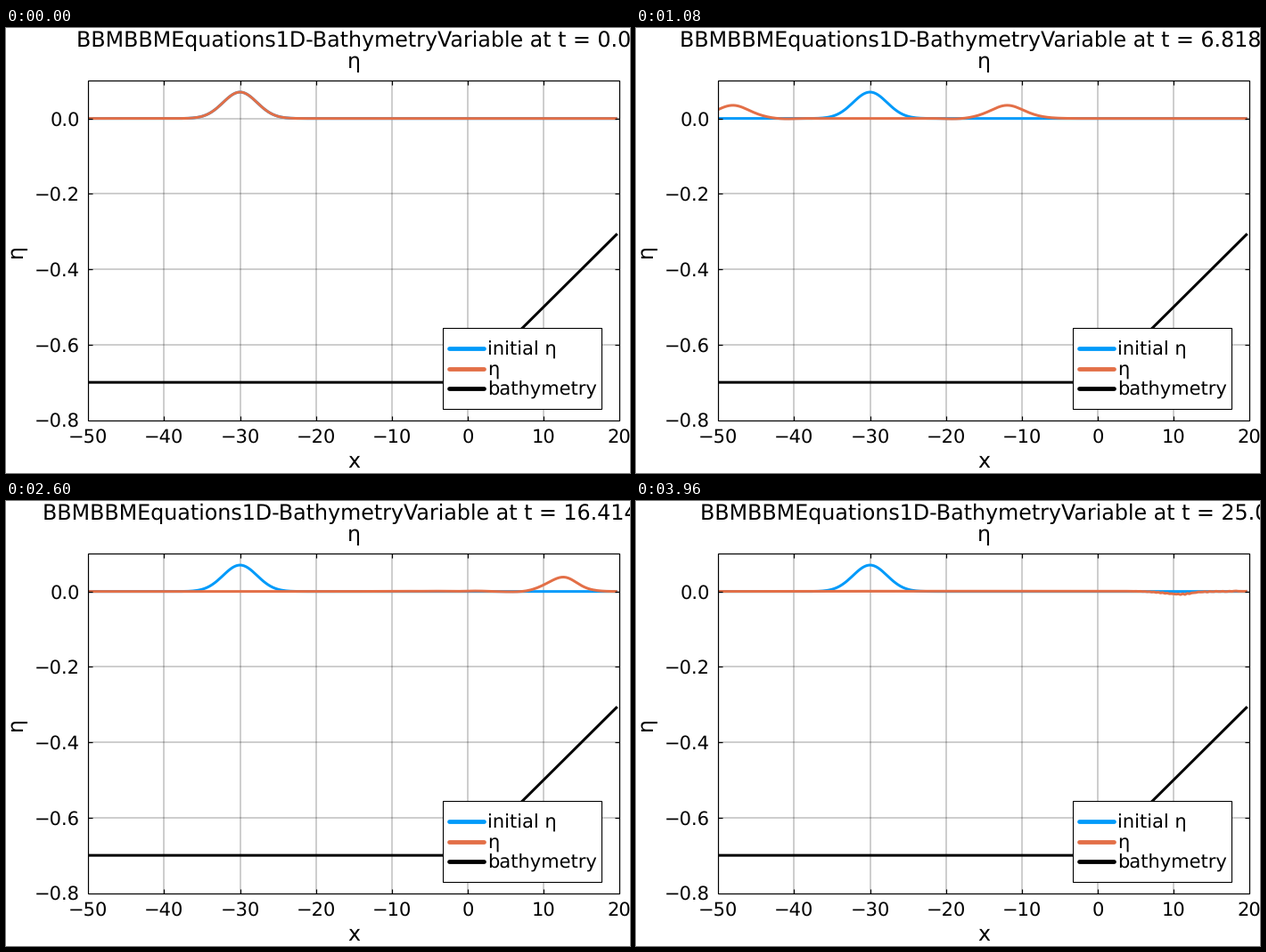
A matplotlib script for the animation above (4 s loop, 700 by 500 pixels).

```python
import numpy as np
import matplotlib.pyplot as plt
from matplotlib.animation import FuncAnimation
from matplotlib.patches import Rectangle

plt.rcParams["font.family"] = "DejaVu Sans"
plt.rcParams["text.hinting"] = "none"

W, H, DPI = 700, 500, 100
FRAMES, T_END = 100, 25.0
LEFT, RIGHT, TOP, BOTTOM = 92.3, 688.2, 59.3, 440.5
BLUE, ORANGE = "#009AFA", "#E36F47"
BIG, SMALL = 23.7, 21.0


def px(size):
    return size * 72 / DPI


def to_x(x):
    return LEFT + (x + 50) / 70 * (RIGHT - LEFT)


def to_y(y):
    return TOP + (0.1 - y) / 0.9 * (BOTTOM - TOP)


# BBM-BBM equations with variable bathymetry on a periodic grid
N, X0, X1, G = 512, -130.0, 20.0, 9.81
dx = (X1 - X0) / N
x = X0 + dx * np.arange(N)
depth = 0.7 - 0.02 * np.maximum(x, 0)
eta0 = 0.07 * np.exp(-0.1 * (x + 30) ** 2)


def stencil(weights):
    """Periodic matrix from {offset: weight}."""
    return sum(w * np.roll(np.eye(N), k, axis=1) for k, w in weights.items())


D1 = stencil({-2: 1, -1: -8, 1: 8, 2: -1}) / (12 * dx)
D2 = stencil({-2: -1, -1: 16, 0: -30, 1: 16, 2: -1}) / (12 * dx ** 2)
K = np.diag(depth ** 2) / 6
A_eta = -np.linalg.solve(np.eye(N) - D1 @ K @ D1, D1)
A_v = -np.linalg.solve(np.eye(N) - D2 @ K, D1)


def rhs(u):
    eta, v = u
    return np.array([A_eta @ ((eta + depth) * v),
                     A_v @ (G * eta + 0.5 * v ** 2)])


def solve(substeps=5):
    u = np.array([eta0, np.zeros(N)])
    h = T_END / (FRAMES - 1) / substeps
    waves = [eta0]
    for _ in range(FRAMES - 1):
        for _ in range(substeps):
            k1 = rhs(u)
            k2 = rhs(u + h / 2 * k1)
            k3 = rhs(u + h / 2 * k2)
            k4 = rhs(u + h * k3)
            u = u + h / 6 * (k1 + 2 * k2 + 2 * k3 + k4)
        waves.append(u[0])
    return waves


waves = solve()

fig = plt.figure(figsize=(W / DPI, H / DPI), dpi=DPI, facecolor="white")
ax = fig.add_axes([0, 0, 1, 1])
ax.set_xlim(0, W)
ax.set_ylim(H, 0)
ax.axis("off")


def label(lx, ly, text, size, ha="center", **kw):
    return ax.text(lx, ly, text, fontsize=px(size), ha=ha, va="baseline",
                   color="black", zorder=8, **kw)


def stroke(xs, ys, width, color="black", z=3, **kw):
    return ax.plot(xs, ys, color=color, lw=px(width), zorder=z,
                   solid_capstyle=kw.pop("cap", "butt"),
                   solid_joinstyle="round", **kw)[0]


def number(value, fmt):
    return format(value, fmt).replace("-", "\u2212")


# grid, ticks and tick labels
TICK = 5
for v in range(-50, 21, 10):
    gx = to_x(v)
    label(gx, 465.3, number(v, "d"), SMALL)
    if -50 < v < 20:
        stroke([gx, gx], [TOP, BOTTOM], 1.9, z=1, alpha=0.2)
        stroke([gx, gx], [BOTTOM, BOTTOM - TICK], 1.2, z=5)
        stroke([gx, gx], [TOP, TOP + TICK], 1.2, z=5)
for i in range(5):
    v = -0.2 * i
    gy = to_y(v)
    label(83.2, gy + 7.7, number(v if i else 0.0, ".1f"), SMALL, "right")
    if i < 4:
        stroke([LEFT, RIGHT], [gy, gy], 1.9, z=1, alpha=0.2)
        stroke([LEFT, LEFT + TICK], [gy, gy], 1.2, z=5)
        stroke([RIGHT, RIGHT - TICK], [gy, gy], 1.2, z=5)

frame = Rectangle((LEFT, TOP), RIGHT - LEFT, BOTTOM - TOP, fill=False,
                  ec="black", lw=px(1.2), zorder=5)
ax.add_patch(frame)

# curves
xs = to_x(x)
curves = [stroke(xs, to_y(y), 3, c, z=3 + i / 10)
          for i, (y, c) in enumerate([(eta0, BLUE), (eta0, ORANGE),
                                      (-depth, "black")])]
for c in curves:
    c.set_clip_path(frame)
wave = curves[1]

# legend
ax.add_patch(Rectangle((489.8, 337.2), 178.6, 90.6, fc="white", ec="black",
                       lw=px(1.1), zorder=6))
for i, (name, color) in enumerate([("initial \u03b7", BLUE), ("\u03b7", ORANGE),
                                   ("bathymetry", "black")]):
    ly = 360 + 22.6 * i
    stroke([497.2, 535.8], [ly, ly], 4.8, color, z=7, cap="round")
    label(540.3, ly + 7.6, name, SMALL, "left")

# titles
title = label(390.2, 20.6, "", BIG)
label(390.2, 45.5, "\u03b7", BIG)
label(390.2, 494.3, "x", BIG)
label(18.3, 250, "\u03b7", BIG, rotation=90, rotation_mode="anchor")


def update(i):
    t = round(T_END * i / (FRAMES - 1), 5)
    title.set_text(f"BBMBBMEquations1D-BathymetryVariable at t = {t}")
    wave.set_ydata(to_y(waves[i]))
    return title, wave


anim = FuncAnimation(fig, update, frames=FRAMES, interval=40, repeat=True,
                     repeat_delay=0, blit=False)
plt.show()
```
